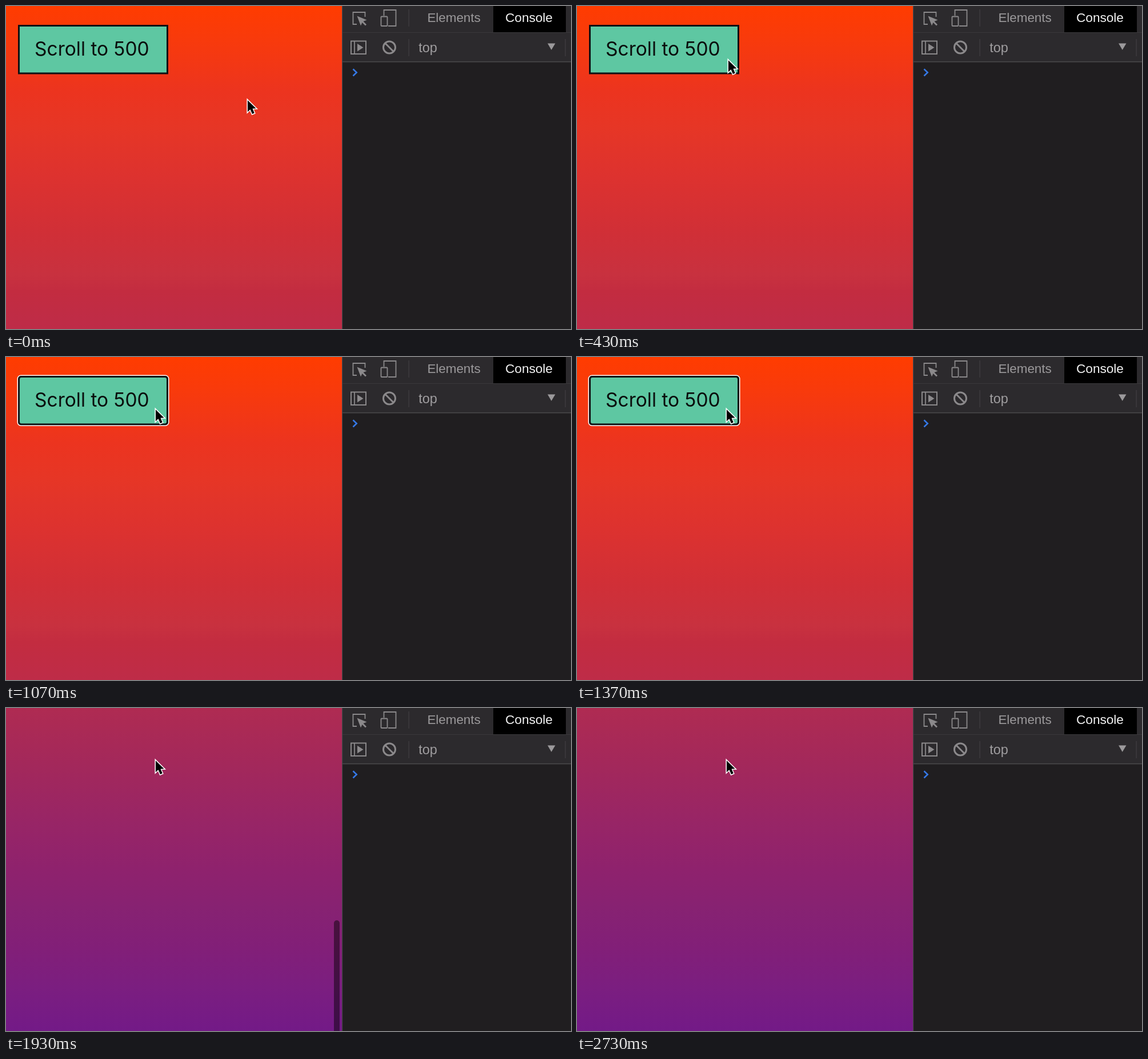
Animation of 989x566 px, one loop 2.83 s. Source, as an HTML page with a canvas:

```html
<!DOCTYPE html>
<html lang="en">
<head>
<meta charset="utf-8">
<title>Scroll to 500</title>
<style>
html, body { margin: 0; width: 100%; height: 100%; overflow: hidden; background: #201e20; }
canvas { display: block; }
</style>
</head>
<body>
<canvas id="stage" width="989" height="566"></canvas>
<script>
const ctx = document.getElementById('stage').getContext('2d');
const W = 989, H = 566, PAGE = 588, LOOP = 2830;
const FOCUS_AT = 1000, SCROLL_AT = 1400;
const GREY = '#8b898b';

function gradient(stops) {
  const g = ctx.createLinearGradient(0, 0, 0, H);
  for (const [y, color] of stops) g.addColorStop(y / H, color);
  return g;
}

const topFill = gradient([
  [0, '#ff3c00'], [60, '#f83a0c'], [150, '#ec341f'], [215, '#e63626'],
  [300, '#dd322f'], [400, '#d02f37'], [470, '#c8313f'], [500, '#c32c40'], [566, '#be2c48']
]);
const scrolledFill = gradient([
  [0, '#af2b52'], [100, '#a3285b'], [200, '#982566'], [280, '#8f226d'],
  [350, '#872272'], [420, '#821f78'], [490, '#7b1e80'], [566, '#731a87']
]);

function box(x, y, w, h, color, r = 0) {
  ctx.fillStyle = color;
  ctx.beginPath();
  ctx.roundRect(x, y, w, h, r);
  ctx.fill();
}

function trace(points, closed) {
  ctx.beginPath();
  points.forEach(([x, y], i) => i ? ctx.lineTo(x, y) : ctx.moveTo(x, y));
  if (closed) ctx.closePath();
}

function shape(points, color) {
  trace(points, true);
  ctx.fillStyle = color;
  ctx.fill();
}

function line(points, color, width) {
  trace(points, false);
  ctx.strokeStyle = color;
  ctx.lineWidth = width;
  ctx.stroke();
}

function frame(x, y, w, h, width, r = 0) {
  ctx.strokeStyle = GREY;
  ctx.lineWidth = width;
  ctx.beginPath();
  ctx.roundRect(x, y, w, h, r);
  ctx.stroke();
}

function label(text, x, y, font, color) {
  ctx.font = font;
  ctx.fillStyle = color;
  ctx.fillText(text, x, y);
}

function drawButton(focused) {
  const r = focused ? 5 : 0;
  if (focused) box(19.5, 31.5, 266, 89.5, '#fff', 6.5);
  box(21, 33, 263, 86.5, '#101114', r);
  box(24, 36, 257, 80.5, '#5ec7a2', focused ? 3 : 0);
  label('Scroll to 500', 50, 87, '33.5px Inter, "Liberation Sans", sans-serif', '#0a0d0c');
}

function drawThumb(alpha) {
  if (alpha > 0) box(574, 372, 10, 230, `rgba(0,0,0,${0.53 * alpha})`, 5);
}

function drawIcons() {
  // element picker
  line([[628.5, 19], [628.5, 11], [607.5, 11], [607.5, 32], [614, 32]], GREY, 1.8);
  shape([[614.5, 17.5], [631.5, 24.5], [625.5, 27], [631, 32.5], [629, 34.5], [623.5, 29], [621, 34.5]], GREY);
  // device toggle
  line([[661.5, 17], [661.5, 7], [682.5, 7], [682.5, 35], [669, 35]], GREY, 1.8);
  frame(656.5, 18.5, 11, 16.5, 1.8, 1);
  // sidebar toggle
  frame(604, 61.5, 26, 22.5, 2);
  line([[610, 61], [610, 84]], GREY, 1.8);
  shape([[615, 66], [625.5, 72.7], [615, 79.5]], GREY);
  // clear
  ctx.beginPath();
  ctx.arc(671, 72.5, 10.5, 0, Math.PI * 2);
  ctx.strokeStyle = GREY;
  ctx.lineWidth = 3;
  ctx.stroke();
  line([[663.5, 65], [678.5, 80]], GREY, 3);
}

function drawPanel() {
  const sans = '"Liberation Sans", Arial, sans-serif';
  box(PAGE, 0, W - PAGE, H, '#201e20');
  box(PAGE, 0, W - PAGE, 98, '#2c2a2d');
  box(PAGE, 46, W - PAGE, 1, '#3a383b');
  box(PAGE, 97, W - PAGE, 1.5, '#4a494b');
  box(853, 0, 127, 46, '#000');
  box(PAGE, 0, 1.2, H, '#49464a');
  for (const [x, y] of [[704.5, 6], [704.5, 58], [978.5, 58]]) box(x, y, 1.3, 30, '#3f3d40');
  drawIcons();
  label('Elements', 737.4, 28, '22.4px ' + sans, '#9b999b');
  label('Console', 874, 28, '22.6px ' + sans, '#f4f4f4');
  label('top', 722.3, 80.5, '23.4px ' + sans, '#a09ea0');
  shape([[948, 65.5], [961.5, 65.5], [954.7, 77]], '#9b999b');
  line([[607.5, 110.5], [613.7, 116.5], [607.5, 122.5]], '#3578e5', 2.6);
}

function drawCursor(x, y) {
  ctx.save();
  ctx.translate(x, y);
  ctx.lineJoin = 'miter';
  trace([[1, 2.2], [1, 22.6], [5.6, 18.2], [9, 26.2], [12.8, 24.6], [9.5, 16.8], [15.6, 16.6]], true);
  ctx.strokeStyle = '#fff';
  ctx.lineWidth = 3;
  ctx.stroke();
  ctx.fillStyle = '#000';
  ctx.fill();
  ctx.restore();
}

const clamp = v => Math.min(1, Math.max(0, v));
const progress = (t, from, to) => clamp((t - from) / (to - from));
const ease = p => (1 - Math.cos(Math.PI * p)) / 2;

function cursorAt(t) {
  const reach = ease(progress(t, 0, 430));
  const settle = progress(t, 430, 530);
  return [422 - 158 * reach - 3 * settle, 163 - 70 * reach - 3 * settle];
}

function render(t) {
  const scrolled = t >= SCROLL_AT;
  box(0, 0, PAGE, H, scrolled ? scrolledFill : topFill);
  if (scrolled) drawThumb(1 - progress(t, 1900, 2170));
  else drawButton(t >= FOCUS_AT);
  drawPanel();
  drawCursor(...cursorAt(t));
}

const start = performance.now();
function tick() {
  render((performance.now() - start) % LOOP);
  requestAnimationFrame(tick);
}
tick();
</script>
</body>
</html>
```
